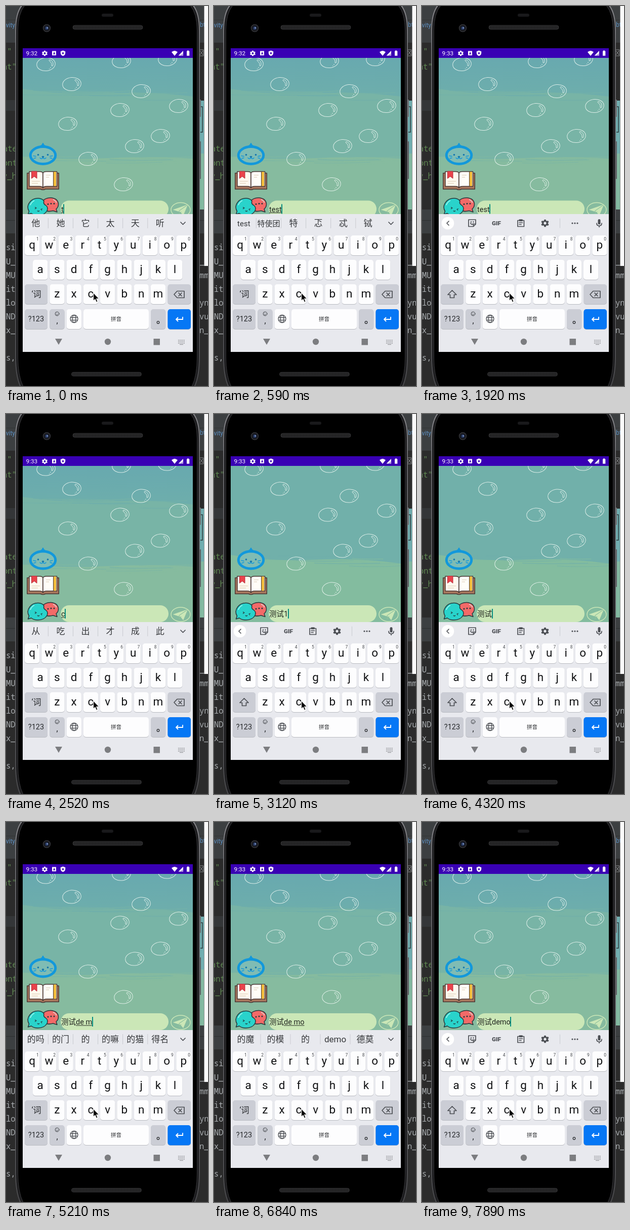
Write an HTML page that moves like this. It is 399 px wide and 747 px high and loops after 8000 ms.

```html
<!DOCTYPE html>
<html lang="zh-CN">
<head>
<meta charset="utf-8">
<title>Pinyin input</title>
<style>
html, body { margin: 0; width: 100%; height: 100%; overflow: hidden; background: #2b2b2b; }
svg { display: block; }
text { font-family: Roboto, "Noto Sans CJK SC", "Noto Sans CJK", sans-serif; white-space: pre; }
.mid { text-anchor: middle; }
.code text { font: 15.5px "Noto Sans Mono", "DejaVu Sans Mono", monospace; fill: #a9adb0; }
.code .str { fill: #5f8752; }
.code .tab { font: 12px Roboto, sans-serif; fill: #5d8fc0; }
.line { fill: none; stroke: #4c4f54; stroke-width: 1.7; stroke-linejoin: round; stroke-linecap: round; }
</style>
</head>
<body>
<svg width="399" height="747" viewBox="0 0 399 747">
  <defs>
    <linearGradient id="sky" x2="0" y2="1">
      <stop offset="0" stop-color="#68a9af"/><stop offset=".3" stop-color="#6fafab"/>
      <stop offset="1" stop-color="#75b3a7"/>
    </linearGradient>
    <linearGradient id="rim" x2="0" y2="1">
      <stop offset="0" stop-color="#8b8b8f"/><stop offset=".12" stop-color="#66666a"/>
      <stop offset="1" stop-color="#4a4a4d"/>
    </linearGradient>
    <pattern id="mesh" width="3" height="3" patternUnits="userSpaceOnUse">
      <rect width="3" height="3" fill="#1b1b1c"/><circle cx="1.5" cy="1.5" r=".9" fill="#39393b"/>
    </pattern>
    <clipPath id="view"><rect x="33" y="102" width="336" height="307"/></clipPath>
    <g id="bubble" fill="none" stroke="#eef8f3" opacity=".85">
      <ellipse rx="18.300" ry="13" transform="rotate(-6)"/>
      <path d="M7-9Q15-7 14 1Q13 5 11 3Q12-3 7-6Q5-8 7-9ZM8 7l2-1M6 9h1"/>
    </g>
    <path id="gear" d="M-1.3-6h2.6l.5 1.8 1.3.7 1.8-.6 1.3 2.3-1.4 1.2v1.2l1.4 1.2-1.3 2.3-1.8-.6-1.3.7-.5 1.8h-2.6l-.5-1.8-1.3-.7-1.8.6-1.3-2.3 1.4-1.2v-1.2l-1.4-1.2 1.3-2.3 1.8.6 1.3-.7ZM0-2.2a2.2 2.2 0 1 0 .01 0Z" fill-rule="evenodd"/>
  </defs>

  <!-- desktop behind the phone -->
  <g class="code">
    <rect width="399" height="747" fill="#2b2b2b"/>
    <rect width="399" height="72" fill="#3c3f41"/>
    <rect y="27" width="399" height="1" fill="#323435"/>
    <rect y="185" width="24" height="21" fill="#343638"/>
    <rect y="400" width="399" height="47" fill="#3c3f41"/>
    <rect y="421" width="399" height="1" fill="#2d2f30"/>
    <rect x="382" y="186" width="9" height="214" fill="#71aeb0"/>
    <rect x="382" y="290" width="9" height="110" fill="#83b9a1"/>
    <path d="M384 198h4v50h-4" fill="none" stroke="#2b3a3b" stroke-width="1.5"/>
    <path d="M383 86h7v12h-7m0-10 6 8m0-8-6 8" fill="none" stroke="#8a8d8f"/>
    <text class="tab" x="18" y="42" text-anchor="end">ivity</text>
    <text class="tab" x="383" y="41">bt</text>
    <g id="code"></g>
    <rect x="391.5" width="8" height="511" fill="#fbfbfb"/>
  </g>

  <!-- phone -->
  <rect x="381" y="184" width="4" height="34" rx="1" fill="#707376"/>
  <rect x="381" y="266" width="4" height="74" rx="1" fill="#606366"/>
  <path d="M19 48Q19 12 33-3H368Q382 12 382 48V690Q382 730 371 751H30Q19 730 19 690Z" fill="#1c1c1e" stroke="url(#rim)" stroke-width="2"/>
  <path d="M23.500 48Q23.500 15 37-1H364Q377.500 15 377.500 48V690Q377.500 727 367 748H34Q23.500 727 23.500 690Z" stroke="#38383b"/>
  <rect x="189" y="15" width="23" height="6" rx="3" fill="#19191b"/>
  <rect x="132" y="38" width="138" height="8" rx="4" fill="url(#mesh)" stroke="#333335"/>
  <rect x="129.500" y="720" width="138" height="7.500" rx="3.700" fill="url(#mesh)" stroke="#333335"/>
  <circle cx="80.500" cy="43.500" r="7" fill="#17181c" stroke="#343539" stroke-width="1.500"/>
  <circle cx="80.500" cy="43.500" r="3.500" fill="#23345c"/>
  <circle cx="81.500" cy="43" r="1.500" fill="#8298c4"/>

  <!-- status bar -->
  <rect x="33" y="83" width="336" height="19.500" fill="#3900b4"/>
  <g fill="#fff">
    <text id="clock" x="39.500" y="97" font-size="11.800"></text>
    <use href="#gear" transform="translate(76.500 93) scale(.88)"/>
    <path d="M91 88.500h8v8.500h-8ZM93 95.500h1l.4-1h1.500l.4 1h1l-1.700-5h-.9Z" fill-rule="evenodd"/>
    <path d="M112.500 87.500l4.700 1.800v3.200q0 4-4.700 5.800q-4.700-1.800-4.700-5.800v-3.200ZM112.500 90.500l-2 2 2 3 2-3Z" fill-rule="evenodd"/>
    <path d="M327 90.500q6-5 12 0l-6 7.500ZM350 88v9.500h-9.500ZM357 88.500h1.500v-1.200h2v1.200h1.800v9.200h-5.300Z"/>
    <path d="M345 97l4.500-4v4Z" fill="#3900b4" opacity=".45"/>
  </g>

  <!-- app -->
  <g clip-path="url(#view)">
    <g id="painted"></g>
    <g id="flat"></g>
    <g id="app">
      <g id="bubbles"></g>
      <g stroke-linecap="round" stroke="#1298db" fill="none">
        <path d="M66 270Q72 268 73 264Q74 268 80 270" fill="#1298db" stroke-width="2.500" stroke-linejoin="round"/>
        <ellipse cx="73" cy="287" rx="24.700" ry="17" fill="#7fbcb4" stroke-width="5"/>
        <path d="M54 288l5 1M55 293l4-1M92 288l-5 1M91 293l-4-1M67 292q3 3.500 6 0q3 3.500 6 0" stroke-width="1.500"/>
        <g fill="#1677ae" stroke="none"><circle cx="63.500" cy="286" r="1.800"/><circle cx="82.500" cy="286" r="1.800"/><ellipse cx="73" cy="290" rx="2.400" ry="1.700"/></g>
      </g>
      <g stroke="#493735" stroke-width="1.500" stroke-linejoin="round">
        <path d="M41.800 322h62.500v31.500H78q-5 2.500-10 0H41.800Z" fill="#a8775d"/>
        <path d="M46 319h20q7 0 7 4v28q-2-3-7-3H46Z" fill="#fff9ee"/>
        <path d="M100.500 319H80q-7 0-7 4v28q2-3 7-3h20.500Z" fill="#fffdf8"/>
        <path d="M96.500 319.500v28" stroke="#f0bb3a" stroke-width="5"/>
        <path d="M100.500 319v29M93.500 319v29" stroke-width="1"/>
        <path d="M50.500 318.500h10.500v14l-5.200-4-5.300 4Z" fill="#e9434b" stroke="#b52e3c" stroke-width="1"/>
        <path d="M51 338h16M51 342h12M79 326h9M79 330h6" fill="none" stroke="#d9c9b4" stroke-width="1"/>
      </g>
      <g stroke="#25383c" stroke-width="1.500" stroke-linejoin="round">
        <path d="M71 378Q78 370 89 370.500Q103 372 103.500 383Q103.500 389 99 392.500L101 398.500L93 396Q82 399 74 394Z" fill="#f36a68"/>
        <path d="M47 379Q53 371 64 371.500Q72 372 75 377Q73 382 78 385Q84 389 81 396Q76 405 63 405Q55 405 50 401L43.500 403L45.500 397Q40 388 47 379Z" fill="#29d3cb"/>
        <path d="M57 389l3 1.500-3 2M72 392l-3 1 2 2.500M62 396q2 2 4 0" fill="none" stroke-width="1.200"/>
        <path d="M48 385q2-6 8-9M93 374q5 2 6.500 6" fill="none" stroke="#c9fffa" stroke-width="1.300"/>
        <g fill="#25383c" stroke="none"><circle cx="83" cy="383" r="1.500"/><circle cx="89" cy="382" r="1.500"/><circle cx="95" cy="382" r="1.500"/></g>
      </g>
      <rect x="108" y="376" width="213" height="33" rx="16.500" fill="#cbe7b7"/>
      <g fill="none" stroke="#cbe7b7" stroke-width="1.400">
        <ellipse cx="345" cy="394" rx="19" ry="14"/>
        <path d="M332 394l26-9-8 19-5-6Z" fill="#cbe7b7"/>
        <path d="M358 385l-16 11v7l4-5" stroke="#8fc19f" stroke-width="1.200"/>
      </g>
      <text id="typed" x="109" y="398" font-size="14.500" fill="#20251f"><tspan id="done"></tspan><tspan id="comp"></tspan></text>
      <rect id="under" y="399.500" height="1" fill="#20251f"/>
      <rect id="caret" y="383" width="2" height="19" fill="#0a8f81"/>
    </g>
  </g>

  <!-- keyboard -->
  <rect x="33" y="409" width="336" height="271" fill="#e8e9ee"/>
  <g id="words" fill="#36383b" font-size="17"></g>
  <path id="more" class="line" d="M345 425l4.500 4.500 4.500-4.500"/>
  <g id="tools">
    <circle cx="51" cy="427" r="12.300" fill="#fff"/>
    <g class="line">
      <path d="M53 423l-4 4 4 4M92 420h14v9l-4.500 4.500H92ZM106 428.500h-4.500v5M96 427q2 4 5 1"/>
      <path d="M189 421.500h12.500v12H189ZM192.500 420h5.500v2.500h-5.500ZM192 426h6.500M192 429.500h4"/>
      <path d="M345 427q0 5 5 5t5-5M350 432v2.500"/>
      <path d="M272.500 418v18" stroke="#c9cbd0" stroke-width="1"/>
    </g>
    <g fill="#4c4f54">
      <circle cx="97" cy="424.500" r="1.200"/><circle cx="101.500" cy="424.500" r="1.200"/>
      <text class="mid" x="147" y="431" font-size="11.800" font-weight="800">GIF</text>
      <use href="#gear" transform="translate(243 427) scale(1.220)"/>
      <circle cx="297" cy="427" r="1.600"/><circle cx="302" cy="427" r="1.600"/><circle cx="307" cy="427" r="1.600"/>
      <rect x="347.500" y="419" width="5" height="10.500" rx="2.500"/>
    </g>
  </g>
  <g id="keys"></g>
  <g fill="#25272a">
    <text id="split" class="mid" x="60" y="572" font-size="16">‘词</text>
    <path id="shift" class="line" d="M59.500 559l8.500 8.500h-4.500v6h-8v-6h-4.500Z"/>
    <path class="line" d="M338 560.500h14v13h-14l-6-6.500ZM341 564l6 6m0-6-6 6"/>
    <text class="mid" x="59.500" y="620" font-size="14.500">?123</text>
    <text class="mid" x="101" y="624" font-size="16">,</text>
    <g class="line" style="stroke-width:1"><circle cx="101" cy="605" r="4"/><path d="M99 606q2 3 4 0M99.500 603.500v.2M102.500 603.500v.2"/></g>
    <g class="line" style="stroke-width:1.300"><circle cx="134.500" cy="615" r="7.500"/><ellipse cx="134.500" cy="615" rx="3.300" ry="7.500"/><path d="M128 612.500h13M128 617.500h13"/></g>
    <text class="mid" x="217.500" y="619" font-size="10.500">拼音</text>
    <circle cx="300.500" cy="622" r="2.300" fill="none" stroke="#25272a" stroke-width="1.200"/>
    <path d="M349 611v5h-13m4-4-4 4 4 4" fill="none" stroke="#fff" stroke-width="1.800"/>
  </g>
  <g fill="#7c7d80">
    <path d="M97 654h14l-7 12Z"/><circle cx="201" cy="660" r="6.200"/><rect x="291.500" y="654" width="12.500" height="12.500"/>
    <path d="M340 657h13M340 660h13M340 663h13" stroke="#8b8c90" stroke-width="1.600" stroke-dasharray="1.600 1.200"/>
    <path d="M343 665.500h7" stroke="#8b8c90"/>
  </g>
  <path d="M172.500 564v15.500l3.500-3.300 2.600 6 2.400-1-2.500-5.900h5Z" stroke="#fff"/>
</svg>
<script>
const $ = id => document.getElementById(id);

function add(parent, tag, attrs, text = '') {
  const node = document.createElementNS('http://www.w3.org/2000/svg', tag);
  for (const name in attrs) node.setAttribute(name, attrs[name]);
  node.textContent = text;
  parent.append(node);
  return node;
}

// visible scraps of the editor and console
const scraps = [
  [-7, 95, ' "', 1], [-7, 125, 'nt"', 1], [-6, 286, 'ate', 1], [-6, 314, 'ont', 1], [-7, 340, 'y_h', 1],
  [0, 480, 'si'], [0, 508, 'U_'], [0, 535, 'MU'], [0, 562, 'it'], [0, 589, 'lo'], [0, 616, 'ND'],
  [0, 643, 'x_'], [0, 697, 's,'], [382, 508, '_'], [382, 535, 'mm'], [382, 589, 'yn'], [382, 616, 'vu'], [382, 643, 'n_']
];
for (const [x, y, s, str] of scraps) add($('code'), 'text', { x, y, class: str ? 'str' : '' }, s);

// painted backdrop: flat washes with dry-brush edges
let seed = 7;
const rand = () => (seed = seed * 16807 % 2147483647) / 2147483647;

function wash(parent, left, right, fill, streak) {
  const sag = (left + right) / 2 + 5;
  add(parent, 'path', { d: `M33 ${left}Q110 ${sag} 200 ${sag - 4}T369 ${right}V409H33Z`, fill });
  for (let i = 0; i < 16; i++) {
    const x = 33 + rand() * 260, y = left + (right - left) * (x - 33) / 336 + rand() * 18 - 5;
    add(parent, 'path', {
      d: `M${x} ${y}q${30 + rand() * 30} ${rand() * 5} ${60 + rand() * 80} ${rand() * 4 - 2}`,
      fill: 'none', stroke: i % 2 ? fill : streak, 'stroke-width': .6 + rand() * 1.4, opacity: .6
    });
  }
}
const box = { x: 33, y: 102, width: 336, height: 307 };
add($('painted'), 'rect', { ...box, fill: 'url(#sky)' });
wash($('painted'), 163, 178, '#78b4a6', '#6dadac');
wash($('painted'), 296, 300, '#86bb9f', '#78b4a6');
add($('flat'), 'rect', { ...box, fill: '#71b0aa' });
wash($('flat'), 277, 294, '#83bc9f', '#71b0aa');

const spots = [[79, 108], [130, 147], [228, 102], [267, 161], [319, 98], [341, 190],
  [225, 198], [122, 225], [305, 249], [254, 269], [162, 294], [232, 344]];
for (const [x, y] of spots) add($('bubbles'), 'use', { href: '#bubble', x, y });

function key(x, y, width, fill = '#fdfdfe', shade = '#b9bbc1') {
  const at = { x, width, height: 39, rx: 5 };
  add($('keys'), 'rect', { ...at, y: y + 1, fill: shade });
  add($('keys'), 'rect', { ...at, y, fill });
}
const pitch = 33.25, grey = '#cbcdd5';
[['qwertyuiop', 37, 451], ['asdfghjkl', 53, 499], ['zxcvbnm', 86.3, 547]].forEach(([row, left, y], r) => {
  [...row].forEach((c, i) => {
    const x = left + i * pitch;
    key(x, y, 29.3);
    add($('keys'), 'text', { class: 'mid', x: x + 14.6, y: y + 26, 'font-size': 22.5, fill: '#111214' }, c);
    if (!r) add($('keys'), 'text', { class: 'mid', x: x + 25.3, y: y + 10, 'font-size': 8.5, fill: '#44474c' }, (i + 1) % 10);
  });
});
key(37, 547, 45, grey);
key(319.5, 547, 45.5, grey);
key(37, 596, 45, grey);
key(86.3, 596, 29.3, grey);
key(119.6, 596, 29.3);
key(153, 596, 129);
key(286, 596, 29.3, grey);
key(319.5, 596, 45.5, '#0677f5', '#5f92d2');

// [time, committed, composing, candidates, caret shown]
const de = '的魔 的模 的 demo 德莫';
const steps = [
  [0, '', 't', '他 她 它 太 天 听', 1],
  [150, '', 'te', '特 忑 忒 铽 慝 忐', 1],
  [440, '', 'te s', '特色 特设 特杀 特使 特 忑', 1],
  [590, '', 'test', 'test 特使团 特 忑 忒 铽', 1],
  [890, 'test', '', '', 1],
  [1030, 'test1', '', '', 1],
  [1630, 'test1', '', '', 0],
  [1920, 'test', '', '', 1],
  [2220, '', '', '', 1],
  [2520, '', 'c', '从 吃 出 才 成 此', 1],
  [2670, '', 'ce shi', '测试 侧室 测 策 侧 册', 1],
  [2970, '测试', '', '', 1],
  [3120, '测试1', '', '', 1],
  [3270, '测试1', 'w', '我 为 无 问 玩 网', 1],
  [3420, '测试1', 'wen', '问 文 温 闻 纹 稳', 1],
  [3720, '测试1', 'w', '我 为 无 问 玩 网', 1],
  [4020, '测试1', '', '', 1],
  [4320, '测试', '', '', 1],
  [4620, '测试', 'd', '的 都 到 等 大 对', 1],
  [4910, '测试', 'de', '的 得 德 地 嘚 锝', 1],
  [5210, '测试', 'de m', '的吗 的门 的 的嘛 的猫 得名', 1],
  [5350, '测试', 'de mo', de, 1],
  [5800, '测试', 'de mo', de, 0],
  [6400, '测试', 'de mo', de, 1],
  [6840, '测试', 'de mo', de, 0],
  [7440, '测试', 'de mo', de, 1],
  [7890, '测试demo', '', '', 1]
];
const show = (id, on) => { $(id).style.display = on ? '' : 'none'; };

function drawWords(list) {
  $('words').textContent = '';
  if (!list) return;
  const words = list.split(' '), gap = words.length === 5 ? 59 : 49.1, first = words.length === 5 ? 62.5 : 58.8;
  words.forEach((word, i) => {
    const x = first + i * gap;
    add($('words'), 'text', { class: 'mid', x, y: 433, 'font-size': word.length > 2 && gap < 50 ? 15 : 17 }, word);
    if (i) add($('words'), 'rect', { x: x - gap / 2 - .5, y: 417, width: 1, height: 20, fill: '#c9cacf' });
  });
}

function apply([time, done, comp, list, caret]) {
  $('done').textContent = done;
  $('comp').textContent = comp;
  const start = done ? $('done').getComputedTextLength() : 0;
  const end = done + comp ? $('typed').getComputedTextLength() : 0;
  $('under').setAttribute('x', 109 + start);
  $('under').setAttribute('width', comp ? end - start : 0);
  $('caret').setAttribute('x', Math.floor(109 + end));
  show('caret', caret);
  show('tools', !list);
  show('shift', !list);
  show('split', list);
  show('more', list);
  drawWords(list);
  $('clock').textContent = time < 890 ? '9:32' : '9:33';
  $('app').setAttribute('transform', `translate(0 ${time < 2220 ? 6.5 : 0})`);
  show('flat', (time >= 2970 && time < 4620) || (time >= 5800 && time < 6840));
}

let current;
function tick() {
  const now = performance.now() % 8000;
  const step = steps.findLast(s => s[0] <= now);
  if (step !== current) apply(current = step);
  requestAnimationFrame(tick);
}
tick();
</script>
</body>
</html>
```
